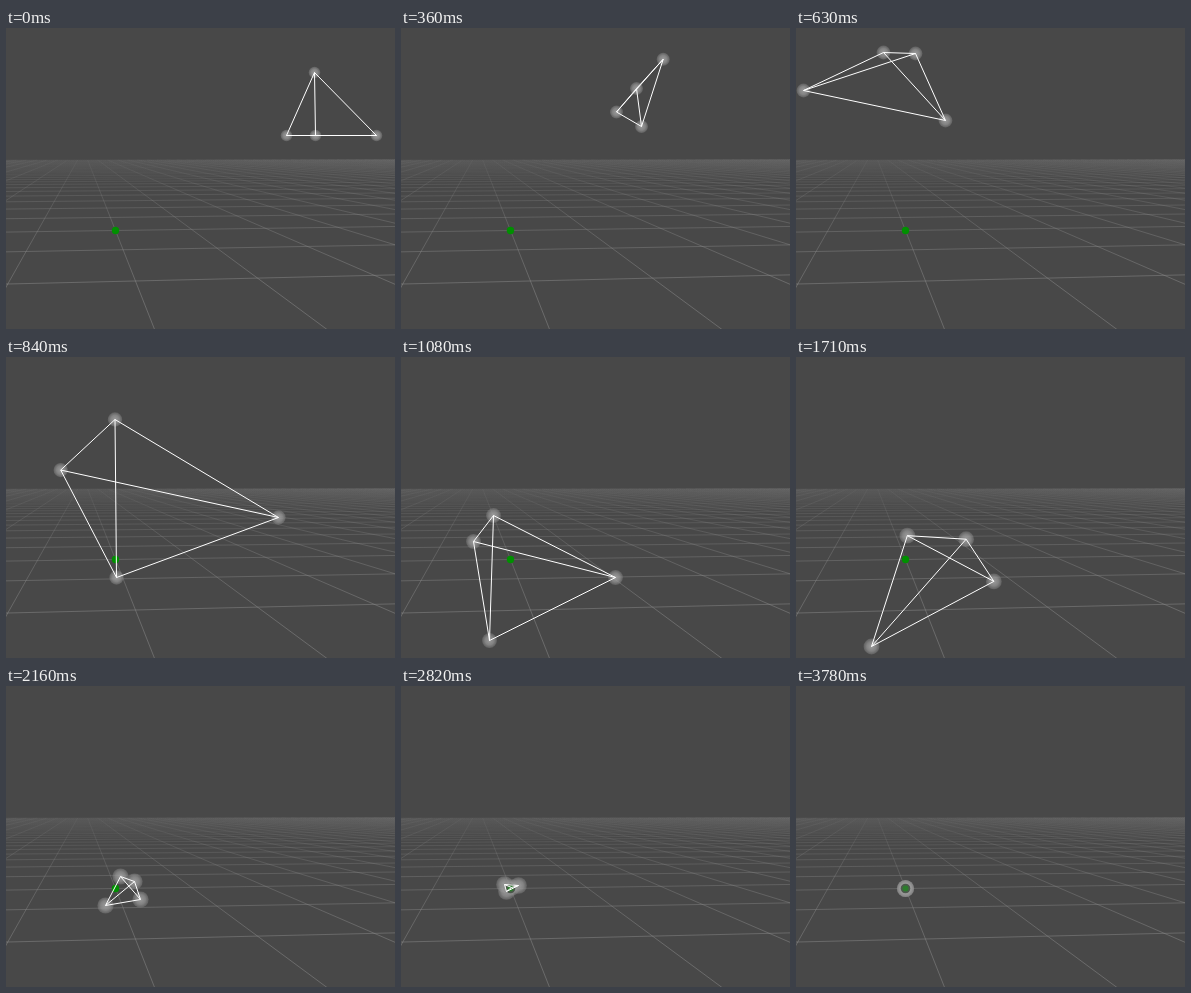
Animation of 389x301 px, one loop 3.81 s. Source, as an HTML page with a canvas:

```html
<!DOCTYPE html>
<html lang="en">
<head>
<meta charset="utf-8">
<title>Simplex search</title>
<style>
html, body { margin: 0; height: 100%; overflow: hidden; background: #484848; }
canvas { display: block; }
</style>
</head>
<body>
<canvas id="stage" width="389" height="301"></canvas>
<script>
const TICK = 30, TICKS = 127;
const ctx = document.getElementById('stage').getContext('2d');
const goal = [109, 202];

// tick, then x,y of the four corners
const poses = [
  [6, 280,107, 308,44, 309,107, 370,107],
  [14, 150,60, 200,13, 235,60, 240,98],
  [21, 7,62, 87,24, 119,25, 149,92],
  [30, 92,153, 130,100, 110,220, 272,160],
  [36, 92,158, 72,184, 88,283, 214,220],
  [46, 92,158, 157,166, 33,268, 188,259],
  [54, 110,175, 175,180, 75,289, 233,230],
  [72, 114,190, 128,195, 99,219, 134,213],
  [94, 103,198, 117,199, 105,205, 110,201],
  [126, ...goal, ...goal, ...goal, ...goal]
];

const lerp = (a, b, p) => a + (b - a) * p;

// Ground plane in perspective, with the goal at its origin
function ground(x, z) {
  const a = 0.0138 * x, b = 0.192 * z, w = 1 + a + b;
  return [(goal[0] + a * 5700 + b * 77) / w, (goal[1] + (a + b) * 121) / w];
}

function line(p, q) {
  ctx.beginPath();
  ctx.moveTo(p[0] + 0.5, p[1] + 0.5);
  ctx.lineTo(q[0] + 0.5, q[1] + 0.5);
  ctx.stroke();
}

function disc([x, y], r, fill) {
  ctx.fillStyle = fill;
  ctx.beginPath();
  ctx.arc(x + 0.5, y + 0.5, r, 0, 7);
  ctx.fill();
}

function sphere(p, r) {
  const x = p[0] + 0.5, y = p[1] + 0.5;
  const shade = ctx.createRadialGradient(x, y, 0, x, y, r);
  shade.addColorStop(0, '#b2b2b2cc');
  shade.addColorStop(0.6, '#9b9b9bb3');
  shade.addColorStop(1, '#87878766');
  disc(p, r, shade);
}

function drawGrid() {
  const fade = ctx.createLinearGradient(0, 122, 0, 260);
  fade.addColorStop(0, '#8c8c8c00');
  fade.addColorStop(0.12, '#8c8c8c21');
  fade.addColorStop(0.5, '#8c8c8c57');
  fade.addColorStop(1, '#8c8c8c80');
  ctx.strokeStyle = fade;
  for (let x = -15; x <= 40; x++) line(ground(x, -3.5), ground(x, 35));
  for (let z = -3; z <= 35; z++) line(ground(-15, z), ground(40, z));
}

// The corners take turns to jump, one per tick
function simplexAt(tick) {
  const n = Math.max(1, poses.findIndex(pose => pose[0] >= tick));
  const from = poses[n - 1], to = poses[n];
  const now = Math.max(tick, from[0]);
  return [0, 1, 2, 3].map(i => {
    const end = to[0] - i;
    const jump = end - 4 * Math.ceil((end - now) / 4);
    let p = Math.min(1, Math.max(0, (jump - from[0]) / (end - from[0])));
    if (to[0] > 54) p *= 2 - p; // settles while converging
    const k = 1 + 2 * i;
    return [lerp(from[k], to[k], p), lerp(from[k + 1], to[k + 1], p)];
  });
}

function draw() {
  const tick = Math.floor(performance.now() / TICK) % TICKS;
  const points = simplexAt(tick);
  const r = 8.7 - 2.9 * Math.exp(-tick / 45);
  ctx.fillStyle = '#484848';
  ctx.fillRect(0, 0, 389, 301);
  drawGrid();
  points.forEach(p => sphere(p, r));
  if (points.some(p => Math.hypot(p[0] - goal[0], p[1] - goal[1]) < r)) {
    disc(goal, 4.8, '#324132bf');
    disc(goal, 3, '#2c7c2c');
  } else {
    disc(goal, 3.7, '#009000');
  }
  ctx.strokeStyle = '#fff';
  points.forEach((p, i) => points.slice(i + 1).forEach(q => line(p, q)));
  requestAnimationFrame(draw);
}
draw();
</script>
</body>
</html>
```
